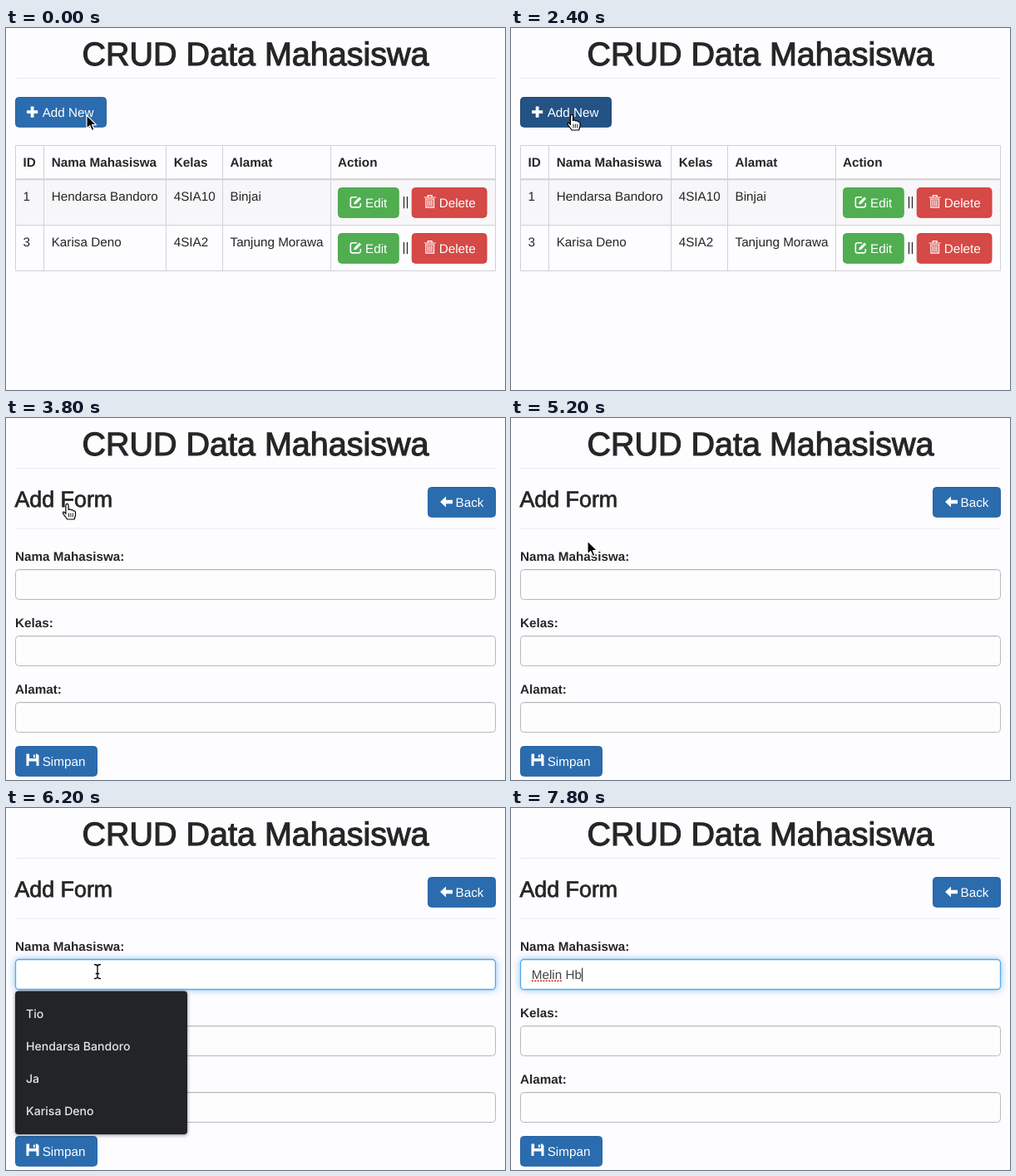
These frames come from a looping animation (600x436 px, 8000 ms). An HTML page:

```html
<!DOCTYPE html>
<html lang="id">
<head>
<meta charset="utf-8">
<title>CRUD Data Mahasiswa</title>
<style>
html, body { margin: 0; width: 100%; height: 100%; overflow: hidden; background: #fdfcfe; }
svg { display: block; width: 100%; height: 100%; }
text { font: 15.25px "Liberation Sans", Arial, sans-serif; fill: #262626; white-space: pre; text-rendering: geometricPrecision; }
.bold { font-weight: bold; }
.title { font-size: 39.5px; stroke: #262626; stroke-width: 1.15px; text-anchor: middle; }
.subtitle { font-size: 26.8px; stroke: #262626; stroke-width: .75px; }
.label { fill: #fff; }
.typed { fill: #444; }
.menu text { font: 500 14.1px Inter, "Open Sans", sans-serif; fill: #e6e7e9; }
.rule { stroke: #eae9eb; fill: none; }
.grid { stroke: #d2d1d3; fill: none; }
.field { fill: #fdfdfe; stroke: #b9b9bb; }
.inset { stroke: #ececee; }
.focus { fill: #fff; stroke: #58a8e8; stroke-width: 1.3px; filter: drop-shadow(0 0 4px #66afe9b0); }
.focus.starting { stroke: #7db9ea; stroke-width: 1px; filter: drop-shadow(0 0 2px #66afe930); }
.blue { fill: #2b6cae; stroke: #2762a0; }
.blue.hover { fill: #235284; stroke: #1f4672; }
.green { fill: #50ae51; stroke: #4aa64b; }
.red { fill: #d54946; stroke: #d0413e; }
.line { fill: none; stroke: #fff; }
.cursor { stroke-linejoin: round; stroke-linecap: round; }
</style>
</head>
<body>
<svg viewBox="0 0 600 436" preserveAspectRatio="none">
  <defs>
    <path id="plus" d="M4.7 0h3.8v4.7h4.7v3.8H8.5v4.7H4.7V8.5H0V4.7h4.7z" fill="#fff"/>
    <path id="back" d="M0 6.5 7 0v4.2h8v4.6H7V13z" fill="#fff"/>
    <g id="edit">
      <path class="line" stroke-width="1.6" d="M8.5 1H3.2A2.4 2.4 0 0 0 .8 3.4V10.8a2.4 2.4 0 0 0 2.4 2.4h7.2a2.4 2.4 0 0 0 2.4-2.4V8.4"/>
      <path fill="#fff" d="M4.6 9.8l.8-3 6-6 2.2 2.2-6 6z"/>
    </g>
    <path id="trash" class="line" stroke-width="1.2" d="M0 3h14M4.6 2.6V.6h4.8v2M1.4 5h11.2M2.2 5v10.2h9.6V5M4.7 6.3v7.4M7 6.3v7.4M9.3 6.3v7.4"/>
    <path id="save" fill="#fff" fill-rule="evenodd"
      d="M0 0h13l2 2v12.5H0zM3.6 0v5.6h7.8V0zM3 9v5.5h9V9zM8.4 1h1.8v3.4H8.4z"/>
    <path id="beamShape" d="M-3.5-8.5Q-.5-8.5 0-6.5 .5-8.5 3.5-8.5M0-6.5V6.5M-3.5 8.5Q-.5 8.5 0 6.5 .5 8.5 3.5 8.5M-1.8 2.5H1.8"/>
  </defs>

  <text class="title" x="300" y="44.6">CRUD Data Mahasiswa</text>
  <path class="rule" d="M11 60.5H589"/>
  <g id="list"></g>
  <g id="form"></g>

  <g class="cursor" id="arrow">
    <path fill="#000" stroke="#fff" stroke-width="1.2" d="M0 0V16l3.7-3.4 2.6 6 2.8-1.2-2.6-5.8h5z"/>
  </g>
  <g class="cursor" id="hand">
    <path fill="#fff" stroke="#000" stroke-width="1.2"
      d="M-1.6 11.5V1.2Q-1.4-.7 0-.7T1.6 1.2V6.5Q3.5 5 4.8 7 6.6 6 7.6 8 10 7.3 10 10v3.5L8.6 18H.2L-4.6 11.6Q-5.6 9.4-4 9.2-3 9.2-1.6 11.5z"/>
    <path stroke="#000" stroke-width=".9" d="M2 11v4M4.4 11v4M6.8 11v4"/>
  </g>
  <g class="cursor" id="beam" fill="none">
    <use href="#beamShape" stroke="#fff" stroke-width="3"/>
    <use href="#beamShape" stroke="#000" stroke-width="1.3"/>
  </g>
</svg>
<script>
const LOOP = 8000, STEP = 200;
const HOVER = 1800, OPEN_FORM = 3800, FOCUS = 5600, TYPE = 6400, MISSPELT = 7200;
const ENTRY = 'Melin Hb', TEXT_X = 24.8;
const students = [
  ['1', 'Hendarsa Bandoro', '4SIA10', 'Binjai'],
  ['3', 'Karisa Deno', '4SIA2', 'Tanjung Morawa']
];
const columns = [20.5, 54.7, 201.7, 269.5, 399];
const iconOffset = { plus: [14, 11.5], back: [15, 11.5], edit: [14.5, 10.7], trash: [15, 9], save: [13.5, 9.5] };
const $ = id => document.getElementById(id);

const text = (x, y, s, cls = '') => `<text class="${cls}" x="${x}" y="${y}">${s}</text>`;
const box = (x, y, w, h, cls, id = '') =>
  `<rect id="${id}" class="${cls}" x="${x + .5}" y="${y + .5}" width="${w - 1}" height="${h - 1}" rx="4"/>`;
const button = (x, y, w, color, icon, label, labelX, id) => {
  const [dx, dy] = iconOffset[icon];
  return box(x, y, w, 36.8, color, id) +
    `<use href="#${icon}" x="${x + dx}" y="${y + dy}"/>` +
    text(x + labelX, y + 23.8, label, 'label');
};

const row = (cells, i) => {
  const y = 192 + 55 * i;
  return cells.map((s, c) => text(columns[c], y + 16.3, s)).join('') +
    button(399, y, 73.7, 'green', 'edit', 'Edit', 33) +
    text(476.6, y + 22, '||') +
    button(487.7, y, 90.8, 'red', 'trash', 'Delete', 33);
};

$('list').innerHTML =
  button(11, 83, 110, 'blue', 'plus', 'Add New', 32.7, 'add') +
  '<path fill="#f7f6f8" d="M11 183H589V238H11z"/>' +
  '<path class="grid" d="M11.5 141.5H588.5V292.5H11.5zM45.5 141V293M192.5 141V293M260.5 141V293M390.5 141V293M11 237.5H589"/>' +
  '<path class="grid" stroke-width="2" d="M11 182.3H589"/>' +
  ['ID', 'Nama Mahasiswa', 'Kelas', 'Alamat', 'Action'].map((s, c) => text(columns[c], 167.3, s, 'bold')).join('') +
  students.map(row).join('');

const field = (label, i) => {
  const y = 182 + 80 * i;
  return text(11, y - 10.5, label + ':', 'bold') + box(11, y, 578, 37, 'field') +
    `<path class="inset" d="M14 ${y + 1.5}H586"/>`;
};

$('form').innerHTML =
  text(10.5, 106.8, 'Add Form', 'subtitle') +
  button(507, 83, 82, 'blue', 'back', 'Back', 33.6) +
  '<path class="rule" d="M11 133H589"/>' +
  ['Nama Mahasiswa', 'Kelas', 'Alamat'].map(field).join('') +
  button(11, 395, 99, 'blue', 'save', 'Simpan', 32.7) +
  box(11, 182, 578, 37, 'focus', 'focus') +
  `<text id="entry" class="typed" x="${TEXT_X}" y="206.3"></text>
   <path id="spelling" stroke="#e2403c" stroke-width="2" stroke-dasharray="2 1.4"/>
   <path id="caret" stroke="#222" stroke-width="1.1"/>
   <g id="menu" class="menu">
     <rect x="11" y="220.5" width="207" height="172.5" rx="4" fill="#222427" style="filter:drop-shadow(0 1px 2px #0007)"/>` +
  ['Tio', students[0][1], 'Ja', students[1][1]].map((s, i) => text(24, 253.4 + 39 * i, s)).join('') +
  '</g>';

const show = (id, on) => { $(id).style.display = on ? '' : 'none'; };

// Time, shape and hot spot of the pointer; it glides between entries.
const pointer = [
  [0, 'arrow', 97, 105],
  [HOVER - STEP, 'arrow', 97, 105],
  [HOVER, 'hand', 88, 105],
  [2200, 'hand', 73, 105],
  [3400, 'hand', 73, 105],
  [3600, 'hand', 73.5, 104],
  [4800, 'hand', 73.5, 104],
  [5000, 'beam', 78, 112],
  [5200, 'arrow', 92, 148],
  [5400, 'beam', 106, 187],
  [FOCUS, 'beam', 110, 197],
  [LOOP, 'beam', 110, 197]
];

function drawPointer(t) {
  const i = pointer.findLastIndex(p => p[0] <= t);
  const [start, shape, x, y] = pointer[i], [end, , nextX, nextY] = pointer[i + 1];
  const k = (t - start) / (end - start);
  for (const id of ['arrow', 'hand', 'beam']) show(id, id === shape && t < TYPE);
  $(shape).setAttribute('transform', `translate(${x + (nextX - x) * k} ${y + (nextY - y) * k})`);
}

function draw(t) {
  const focused = t >= FOCUS, typing = t >= TYPE;
  show('list', t < OPEN_FORM);
  show('form', t >= OPEN_FORM);
  $('add').classList.toggle('hover', t >= HOVER);
  show('focus', focused);
  $('focus').classList.toggle('starting', t < FOCUS + STEP);
  show('menu', focused && !typing);

  const entry = $('entry');
  entry.textContent = typing ? ENTRY.slice(0, (t - TYPE) / STEP + 1) : '';
  const caretX = TEXT_X + .7 + (typing ? entry.getComputedTextLength() : 0);
  $('caret').setAttribute('d', `M${caretX} 192.5V209`);
  show('caret', typing || focused && (t - FOCUS) % 1000 < 500);

  show('spelling', t >= MISSPELT);
  if (t >= MISSPELT) {
    $('spelling').setAttribute('d', `M${TEXT_X} 208.3h${entry.getSubStringLength(0, 5)}`);
  }
  drawPointer(t);
}

function tick() {
  const t = performance.now() % LOOP;
  draw(Math.floor(t / STEP) * STEP);
  requestAnimationFrame(tick);
}
tick();
</script>
</body>
</html>
```
